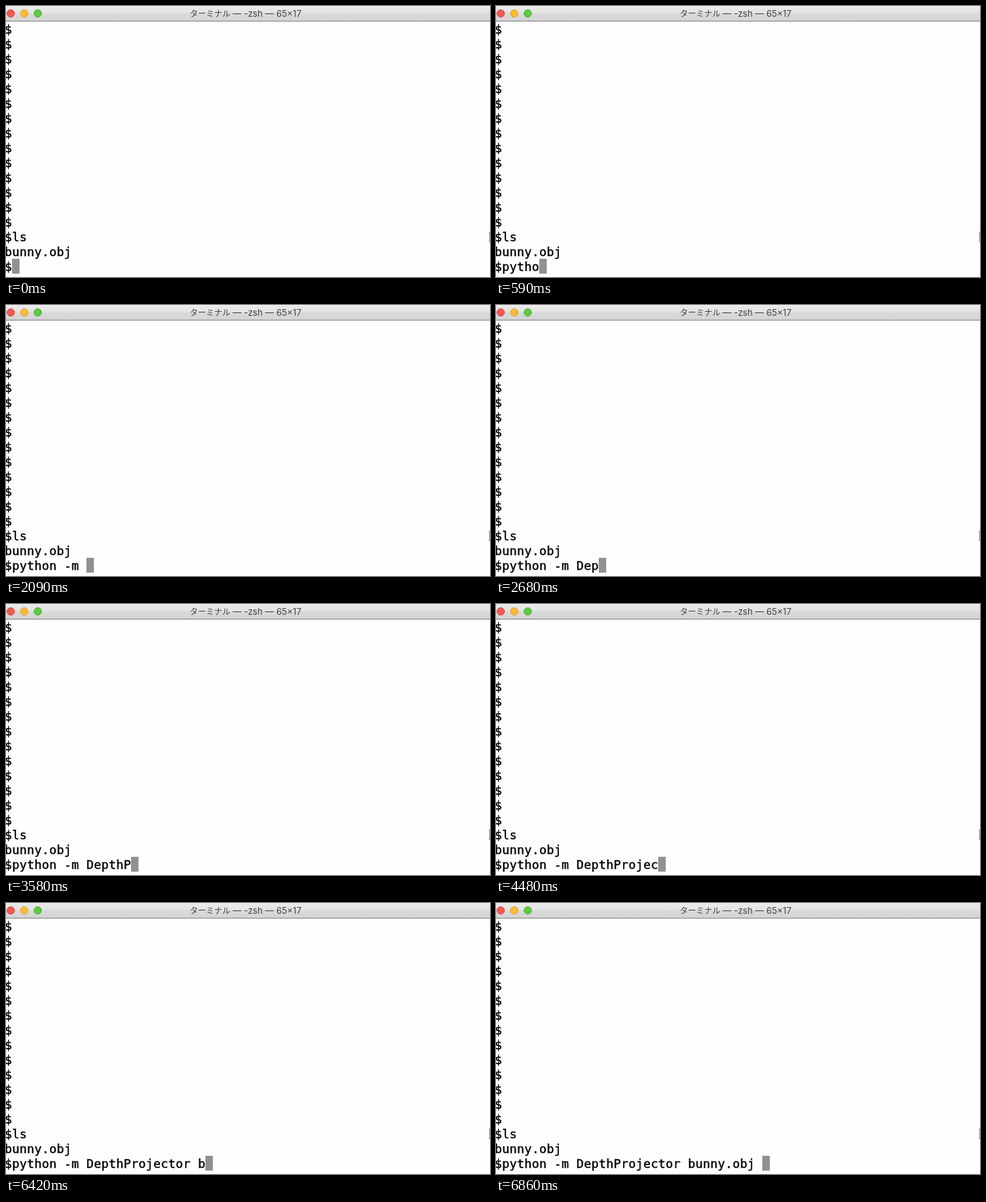
An HTML page for the animation above (8 s loop, 716 by 402 pixels).

```html
<!DOCTYPE html>
<html lang="ja">
<head>
<meta charset="utf-8">
<style>
  html, body { margin: 0; width: 100%; height: 100%; overflow: hidden; background: #fefefe; }
  svg { display: block; }
  .term {
    font: 18px "DejaVu Sans Mono", monospace; letter-spacing: .163px; white-space: pre;
    stroke: #000; stroke-width: .4px;
  }
  .title { font: 13px Inter, sans-serif; fill: #404040; }
  .kana { font: 12px "Noto Sans CJK JP", "Noto Sans CJK", sans-serif; }
</style>
</head>
<body>
<svg width="716" height="402" viewBox="0 0 716 402">
  <defs>
    <linearGradient id="bar" x2="0" y2="1">
      <stop offset="0" stop-color="#eaeaea"/>
      <stop offset=".45" stop-color="#e4e4e4"/>
      <stop offset=".5" stop-color="#dadada"/>
      <stop offset="1" stop-color="#d4d4d4"/>
    </linearGradient>
  </defs>
  <rect width="716" height="402" fill="#fefefe"/>
  <rect width="716" height="22" fill="url(#bar)"/>
  <rect width="716" height="1" fill="#f4f4f4"/>
  <rect y="22" width="716" height="1" fill="#7f7f7f"/>
  <circle cx="7" cy="11" r="5.5" fill="#f25a52" stroke="#db4840"/>
  <circle cx="27" cy="11" r="5.5" fill="#fbbb35" stroke="#dda032"/>
  <circle cx="47" cy="11" r="5.5" fill="#5fc943" stroke="#4aac34"/>
  <g class="title">
    <text class="kana" x="272" y="16">ターミナル</text>
    <text x="437" y="16" text-anchor="end">— -zsh — 65×17</text>
  </g>
  <rect id="caret" y="375" width="11" height="22" fill="#919191"/>
  <g id="lines" class="term"></g>
  <path d="M714 335.5h2M715.5 336v13M714 349.5h2" stroke="#8c8c8c" fill="none"/>
</svg>
<script>
  const CELL = 11, LEFT = -2, TOP = 23, ROW = 22, LOOP = 8000, TICK = 149.3;
  // Text added at each tick; empty parts are pauses, the last one is a tab completion.
  const keys = "$|p|y||tho||n|| |||-|m|| ||D|e|p|t|h||||P|r|o||j|e|c||t|o|r| ||||||||b||u|nny.obj ".split("|");
  const lines = document.getElementById("lines");
  const caret = document.getElementById("caret");

  function addLine(text, row) {
    const el = document.createElementNS("http://www.w3.org/2000/svg", "text");
    el.setAttribute("x", LEFT);
    el.setAttribute("y", TOP + row * ROW + 18);
    el.textContent = text;
    return lines.appendChild(el);
  }

  [...Array(14).fill("$"), "$ls", "bunny.obj"].forEach(addLine);
  const prompt = addLine("$", 16);

  function draw(t) {
    const tick = Math.floor((t % LOOP + 10) / TICK);
    const text = keys.slice(0, tick + 1).join("");
    prompt.textContent = text;
    caret.setAttribute("x", LEFT + text.length * CELL);
  }

  const start = performance.now();
  function frame() {
    draw(performance.now() - start);
    requestAnimationFrame(frame);
  }
  frame();
</script>
</body>
</html>
```
